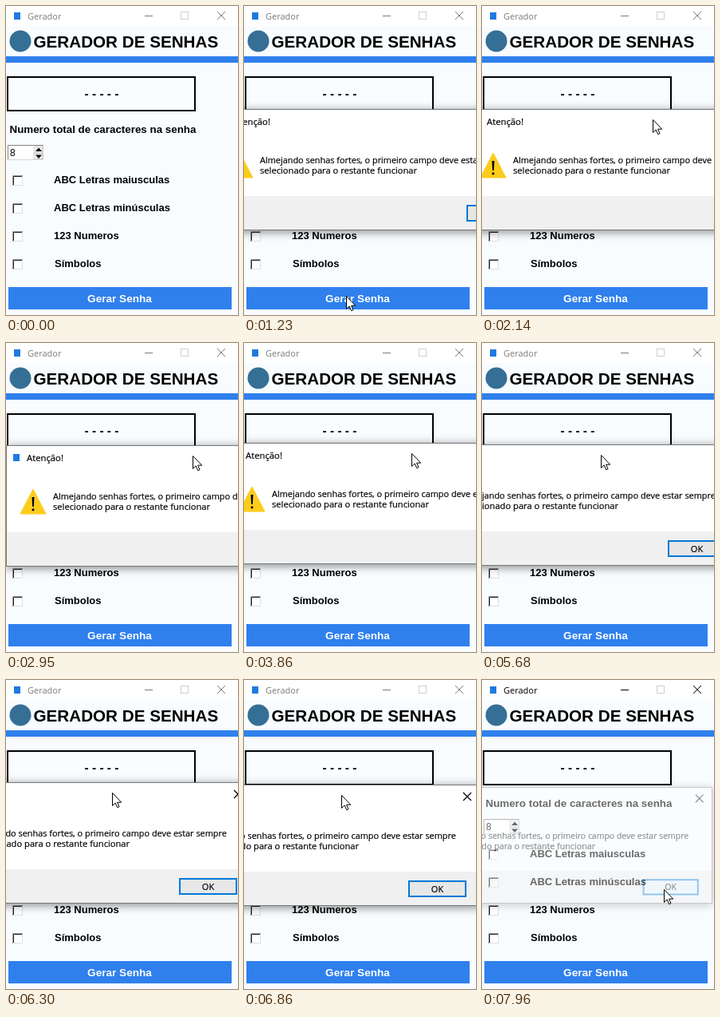
An HTML page that plays this animation: 291 px wide and 387 px high, repeating every 8000 ms.

```html
<!DOCTYPE html>
<html lang="pt">
<head>
<meta charset="utf-8">
<title>Gerador</title>
<style>
  html, body { margin: 0; width: 100%; height: 100%; overflow: hidden; background: #f8fcff; }
  svg { display: block; }
  text { white-space: pre; }
  .bold { font: bold 13px "Liberation Sans", Arial, sans-serif; }
  .ui { font: 10.9px "Open Sans", "Noto Sans", sans-serif; }
  .line { fill: none; stroke: currentColor; }
  #bar { color: #7c7c7c; }
  #bar.active { color: #000; }
  #dialog { transform-origin: 204.5px 76px; }
  #dialog .ui { stroke: #000; stroke-width: .2px; }
  #shade { filter: drop-shadow(0 2px 6px #0007); }
</style>
</head>
<body>
<svg width="291" height="387" viewBox="0 0 291 387">
  <rect width="291" height="387" fill="#f8fcff"/>
  <g id="bar">
    <rect width="291" height="25" fill="#fff"/>
    <rect x="10" y="8" width="8" height="9" fill="#1f7ae0"/>
    <text class="ui" x="27" y="17" style="font-size:11px" fill="currentColor">Gerador</text>
    <path class="line" d="M174 12.5h10M265 7l10 10m0-10l-10 10"/>
    <rect x="219.5" y="7.5" width="9" height="9" fill="none" stroke="#d0d0d0"/>
  </g>

  <circle cx="18" cy="44" r="13.5" fill="#356f96"/>
  <text class="bold" x="34.5" y="51.6" style="font-size:20.65px">GERADOR DE SENHAS</text>
  <rect y="63" width="291" height="8" fill="#2f80ed"/>

  <rect x="2" y="89" width="235" height="42" fill="#fafdff" stroke="#000" stroke-width="2"/>
  <text class="bold" x="120" y="115" text-anchor="middle" style="font-size:15.5px">- - - - -</text>
  <text class="bold" x="4.5" y="159" style="font-size:13.36px">Numero total de caracteres na senha</text>

  <g>
    <rect x="2.5" y="174.5" width="44" height="18" fill="#fff" stroke="#d5d8da"/>
    <path d="M2.5 192v-17.5H47" fill="none" stroke="#858585"/>
    <text x="5" y="188" font-size="12" font-family="Liberation Sans, Arial, sans-serif">8</text>
    <path d="M35 176h11v8H35zM35 184.5h11v7H35z" fill="#f0f0f0" stroke="#b5b5b5" stroke-width=".6"/>
    <path d="M37 182h8l-4-4.5zM37 186.5h8l-4 4.5z"/>
  </g>

  <g id="options"></g>

  <rect x="3" y="352" width="280" height="28" fill="#2f80ed"/>
  <text class="bold" x="142.5" y="371" text-anchor="middle" fill="#fff" style="font-size:13.6px">Gerar Senha</text>

  <g id="place">
    <g id="dialog">
      <rect id="shade" width="409" height="152" fill="#fff"/>
      <rect y="109" width="409" height="43" fill="#f0f0f0"/>
      <rect x=".5" y=".5" width="408" height="151" fill="none" stroke="#777"/>
      <rect x="9" y="11" width="8" height="9" fill="#1f7ae0"/>
      <text class="ui" x="26" y="20" style="font-size:11.3px">Atenção!</text>
      <path class="line" d="M387 10l10 10m0-10l-10 10" stroke-width="1.3"/>
      <path d="M34 55L50 86H18z" fill="#fccc1b" stroke="#fccc1b" stroke-linejoin="round"/>
      <path d="M32.5 65h3l-.7 12h-1.6zM32.7 79.5h2.6v2.7h-2.6z"/>
      <text class="ui" x="59" y="68">Almejando senhas fortes, o primeiro campo deve estar sempre</text>
      <text class="ui" x="59" y="81" style="font-size:11.17px">selecionado para o restante funcionar</text>
      <rect id="ok" x="319" y="121" width="71" height="19" stroke="#0078d7" stroke-width="2"/>
      <text class="ui" x="354.5" y="134.5" text-anchor="middle" style="font-size:11px">OK</text>
    </g>
  </g>

  <path id="cursor" d="M.5 .5V16.5L4.2 13L6.7 18.7L9 17.7L6.6 12.2H11.7z" fill="#fff" stroke="#000"/>
</svg>

<script>
const LOOP = 8000, GRAB = 1700, DROP = 6860;
const $ = id => document.getElementById(id);

// Keys: time, x, y of the pointer
const pointerKeys = [
  [260, 152, 392], [700, 128, 363], [1230, 128, 363], [GRAB, 195, 142],
  [1870, 203, 142], [2140, 214, 142], [2340, 214, 142], [2690, 234, 139],
  [2880, 234, 139], [2950, 234, 141], [3020, 233, 139], [3220, 233, 139],
  [4000, 205, 138], [4760, 177, 139], [5680, 149, 140], [6510, 128, 142],
  [DROP, 122, 144], [7120, 122, 144], [7700, 228, 262]
];
// Keys: time, opacity, scale of the dialog
const fadeKeys = [
  [890, 0, .93], [1020, 1, 1], [7950, 1, 1], [7960, .42, .961]
];

function sample(keys, t) {
  const i = keys.findIndex(k => k[0] > t);
  if (i < 0) return keys.at(-1).slice(1);
  if (i === 0) return keys[0].slice(1);
  const a = keys[i - 1], b = keys[i], p = (t - a[0]) / (b[0] - a[0]);
  return a.slice(1).map((v, j) => v + (b[j + 1] - v) * p);
}

const labels = ["ABC Letras maiusculas", "ABC Letras minúsculas", "123 Numeros", "Símbolos"];
$("options").innerHTML = labels.map((label, i) => `
  <g transform="translate(8 ${212 + 35 * i})">
    <rect width="13" height="13" fill="#fff"/>
    <path d="M.5 13V.5H13" fill="none" stroke="#999"/>
    <path d="M1.5 12V1.5H12" fill="none" stroke="#222"/>
    <path d="M1 12.5H12.5V1" fill="none" stroke="#dcdfe1"/>
    <text class="bold" x="${i === 3 ? 53 : 52}" y="10">${label}</text>
  </g>`).join("");

function draw(now) {
  const t = now % LOOP;
  const [x, y] = sample(pointerKeys, t);
  const [dx, dy] = sample(pointerKeys, Math.min(Math.max(t, GRAB), DROP));
  const [opacity, scale] = sample(fadeKeys, t);
  const left = Math.round(dx) - 234, top = Math.round(dy) - 13;

  $("cursor").setAttribute("transform", `translate(${Math.round(x)} ${Math.round(y)})`);
  $("place").setAttribute("transform", `translate(${left} ${top})`);
  $("dialog").style.opacity = opacity;
  $("dialog").style.transform = scale === 1 ? "none" : `scale(${scale})`;
  $("ok").setAttribute("fill", t > 7650 ? "#e5f1fb" : "#e6e7e6");
  $("bar").classList.toggle("active", t >= 7890 || (t >= 720 && t < 900));
  requestAnimationFrame(draw);
}
requestAnimationFrame(draw);
</script>
</body>
</html>
```
